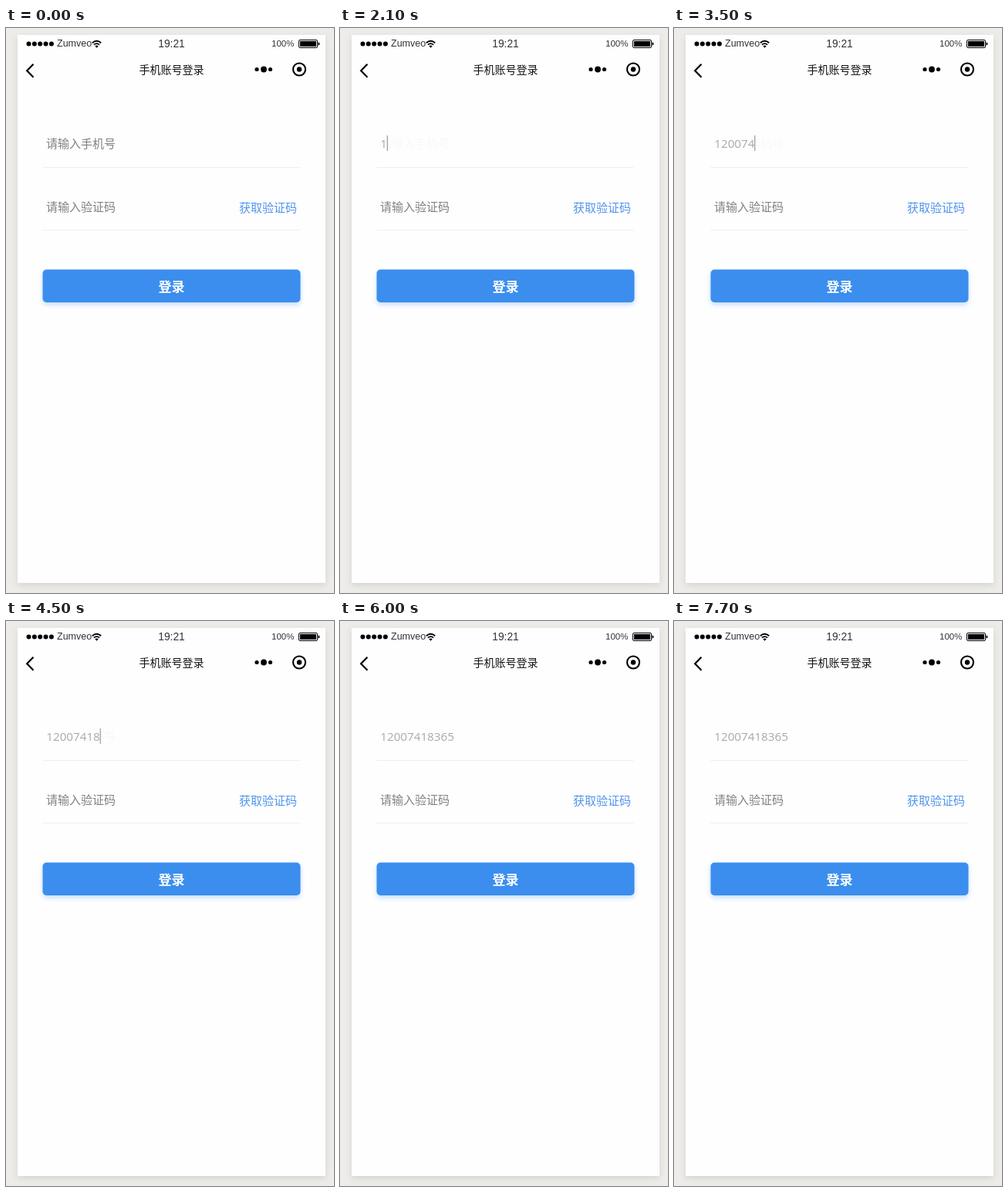
An HTML page for the animation above (8 s loop, 425 by 731 pixels).

```html
<!DOCTYPE html>
<html lang="zh-CN">
<head>
<meta charset="utf-8">
<title>手机账号登录</title>
<style>
  html, body { margin: 0; width: 100%; height: 100%; overflow: hidden; background: #edece8; }
  svg { display: block; font: 15px "Noto Sans CJK SC", "Noto Sans CJK", sans-serif; }
  .card { fill: #fefefe; filter: drop-shadow(0 3px 4px rgba(0, 0, 0, .1)); }
  .status { font-family: "Liberation Sans", Arial, sans-serif; fill: #333; }
  .hint { fill: #808080; }
  .rule { stroke: #f0f0f0; }
  .button { fill: #3b8eed; filter: drop-shadow(0 3px 3px rgba(59, 142, 237, .3)); }
  .number { font: 15.2px "Open Sans", "Noto Sans", sans-serif; fill: #a8a8a8; }
</style>
</head>
<body>
<svg width="425" height="731" viewBox="0 0 425 731">
  <rect class="card" x="15" y="9" width="399" height="709"/>

  <path d="M29.5 20.5h30" stroke="#000" stroke-width="6" stroke-linecap="round" stroke-dasharray="0 7.35"/>
  <g class="status">
    <text x="66" y="24" font-size="12.5">Zumveo</text>
    <text x="214.5" y="25" font-size="13.8" text-anchor="middle">19:21</text>
    <text x="344" y="24" font-size="11.5">100%</text>
  </g>
  <g fill="none" stroke="#000" stroke-width="1.8">
    <path d="M111.8 19.2q5.7-5 11.4 0M113.9 21.6q3.6-3 7.2 0"/>
    <path d="M115.3 23.2q2.2-1.6 4.4 0l-2.2 2.5z" fill="#000" stroke="none"/>
  </g>
  <rect x="379.5" y="15.5" width="24" height="10" rx="1.5" fill="none" stroke="#000"/>
  <path d="M381 17h21v7h-21zM404.5 18.5q2 0 2 2t-2 2z"/>

  <path d="M35.5 46.8L27.2 55.3 35.5 63.8" fill="none" stroke="#000" stroke-width="2.2"/>
  <text x="214.5" y="59" font-size="14" text-anchor="middle" fill="#111">手机账号登录</text>
  <circle cx="325" cy="53.5" r="2.6"/>
  <circle cx="334" cy="53.5" r="3.9"/>
  <circle cx="342.5" cy="53.5" r="2.6"/>
  <circle cx="380" cy="53.5" r="8" fill="none" stroke="#000" stroke-width="2.1"/>
  <circle cx="380" cy="53.5" r="3.2"/>

  <text id="hint" class="hint" x="52" y="155">请输入手机号</text>
  <rect id="cover" x="48" y="136" height="28" fill="#fefefe"/>
  <text id="number" class="number" x="52.3" y="155"></text>
  <rect id="caret" y="139" width="1" height="20" fill="#888"/>
  <path class="rule" d="M47 180.5h334M47 261.5h334"/>
  <text class="hint" x="52" y="237">请输入验证码</text>
  <text x="302" y="238" fill="#5093ec">获取验证码</text>

  <rect class="button" x="47.5" y="312.5" width="334" height="42.5" rx="5"/>
  <text x="214.5" y="341" font-size="17" font-weight="bold" text-anchor="middle" fill="#fff">登录</text>
</svg>
<script>
const LOOP = 8000, DIGITS = "12007418365", STEP = 8.7;
const keyTimes = [2100, 2500, 2700, 3100, 3300, 3500, 4000, 4500, 4700, 5300, 5500];
const caretSpans = [[1200, 1700], [2100, 5200], [5300, 6000], [6500, 6900], [7400, 7700]];
const [hint, cover, number, caret] =
  ["hint", "cover", "number", "caret"].map(id => document.getElementById(id));

function draw(now) {
  const t = now % LOOP;
  const typed = keyTimes.filter(k => k <= t).length;
  const x = 52.1 + STEP * typed;
  number.textContent = DIGITS.slice(0, typed);
  // A faint trace of the hint stays to the right of the typed digits.
  hint.style.fill = typed ? "#f7f8fb" : "";
  cover.setAttribute("width", typed ? x - 47 : 0);
  caret.setAttribute("x", x);
  caret.style.opacity = caretSpans.some(([on, off]) => t >= on && t < off) ? 1 : 0;
  requestAnimationFrame(draw);
}
draw(0);
</script>
</body>
</html>
```
